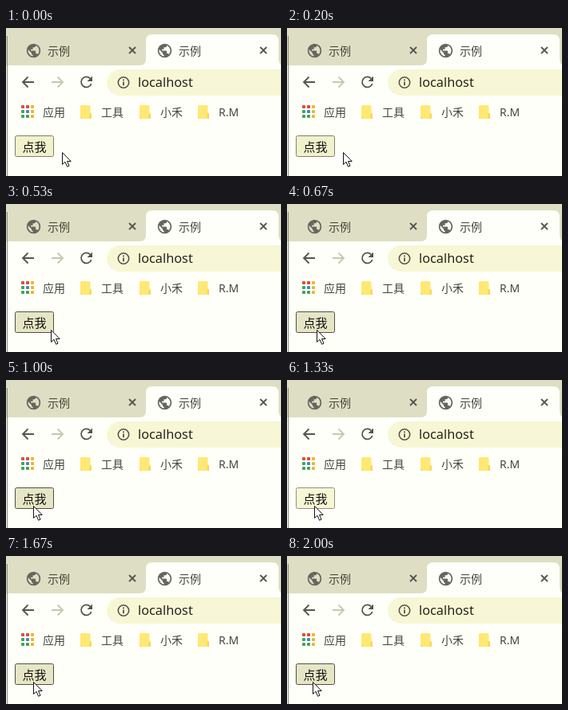
An HTML page that plays this animation: 344 px wide and 186 px high, repeating every 2330 ms.

```html
<!DOCTYPE html>
<html lang="zh">
<head>
<meta charset="utf-8">
<style>
  html, body { margin: 0; width: 100%; height: 100%; overflow: hidden; background: #fffffa; }
  svg { display: block; width: 344px; height: 186px; }
  text { font: 14px "Noto Sans", "Noto Sans CJK SC", "Noto Sans CJK", sans-serif; fill: #45453a; }
  .line { fill: none; stroke: #55554a; stroke-width: 1.8; }
</style>
</head>
<body>
<svg viewBox="0 0 344 186">
  <defs>
    <path id="globe" fill="#66665c" transform="scale(.875) translate(-12 -12)"
          d="M12 2a10 10 0 0 0 0 20 10 10 0 0 0 0-20zM11 19.9C7 19.4 4 16 4 12q0-.9.2-1.8L9 15v1a2 2 0 0 0 2 2zM17.9 17.4A2 2 0 0 0 16 16h-1v-3a1 1 0 0 0-1-1H8v-2h2a1 1 0 0 0 1-1V7h2a2 2 0 0 0 2-2v-.4C18 5.8 20 8.700 20 12q0 3.100-2.100 5.400z"/>
    <path id="close" class="line" d="M-4-4 4 4M4-4-4 4"/>
    <g id="folder">
      <path fill="#ffe873" d="M0 1.5Q0 0 1.5 0H11Q12.5 0 12.5 1.5V9L14 10.5V17H1.5Q0 17 0 15.5Z"/>
      <path fill="#f3d960" d="M0 14.5 3 17H1.5Q0 17 0 15.5ZM11.5 11 14 10.5V17H11.5Z"/>
    </g>
  </defs>

  <!-- tab strip -->
  <rect width="344" height="47" fill="#dedec4"/>
  <path fill="#fffffa" d="M167 47Q175 47 175 39V16Q175 8 183 8H333Q341 8 341 16V39Q341 44 344 46V47Z"/>
  <use href="#globe" x="34.5" y="28.5"/>
  <use href="#globe" x="198.5" y="28.5"/>
  <text x="52" y="33.5">示例</text>
  <text x="216" y="33.5">示例</text>
  <use href="#close" x="158" y="28"/>
  <use href="#close" x="322" y="28"/>

  <!-- toolbar -->
  <path class="line" d="M35 68H21M27.5 61.5 21 68 27.5 74.5"/>
  <path class="line" style="stroke:#c8c8a8" d="M57 68H71M64.5 61.5 71 68 64.5 74.5"/>
  <path class="line" d="M105.3 63.5A6.5 6.5 0 1 0 106.7 70"/>
  <path fill="#55554a" d="M108 60.5V67H101.5Z"/>
  <rect x="126" y="52" width="240" height="33" rx="16.5" fill="#f7f7d6"/>
  <circle class="line" cx="147" cy="68.5" r="6.7" style="stroke-width:1.6"/>
  <path class="line" d="M147 67.5V72.3M147 64.6V66.3"/>
  <text x="165" y="74" style="font-size:16.3px;fill:#25251d">localhost</text>

  <!-- bookmarks -->
  <g id="apps"></g>
  <text x="46" y="111">应用</text>
  <use href="#folder" x="93" y="97"/>
  <text x="119" y="111">工具</text>
  <use href="#folder" x="167" y="97"/>
  <text x="193" y="111">小禾</text>
  <use href="#folder" x="240" y="97"/>
  <text x="266" y="111">R.M</text>

  <!-- page -->
  <rect id="button" x="11.5" y="135.5" width="48" height="26" rx="2"/>
  <text x="20.5" y="155" style="font-size:15px;fill:#111">点我</text>
  <path d="M1.5 10V186" stroke="#88887a"/>
  <path id="cursor" fill="#fff" stroke="#111" stroke-linejoin="round"
        d="M.5.5V15.5L4 12.3 6.6 18.3 9 17.2 6.5 11.5H11.2Z"/>
</svg>
<script>
  const byId = id => document.getElementById(id);
  const [red, green, blue, yellow] = ['#e34a36', '#43a35a', '#4285d8', '#f2b52e'];
  byId('apps').innerHTML = [red, red, yellow, green, blue, yellow, green, green, yellow]
    .map((color, i) => `<rect x="${19 + i % 3 * 6}" y="${97 + Math.floor(i / 3) * 6}" width="4" height="4" rx="1" fill="${color}"/>`)
    .join('');

  const looks = {
    idle: ['#f1f1cc', '#80806a'],
    hover: ['#e6e6c6', '#505042'],
    pressed: ['#f7f7d6', '#92927a'],
  };
  // start time, cursor tip x, y, button look
  const steps = [
    [0, 70, 156, 'idle'],
    [330, 56, 158, 'hover'],
    [670, 37, 158, 'hover'],
    [1000, 34, 158, 'hover'],
    [1330, 34, 158, 'pressed'],
    [1670, 34, 158, 'hover'],
    [2000, 32, 158, 'hover'],
  ];
  const duration = 2330;

  function draw(now) {
    const time = now % duration;
    const [, x, y, look] = steps.findLast(([start]) => start <= time);
    const [fill, stroke] = looks[look];
    byId('cursor').setAttribute('transform', `translate(${x} ${y})`);
    byId('button').setAttribute('fill', fill);
    byId('button').setAttribute('stroke', stroke);
  }

  const origin = performance.now();
  function tick() {
    draw(performance.now() - origin);
    requestAnimationFrame(tick);
  }
  tick();
</script>
</body>
</html>
```
